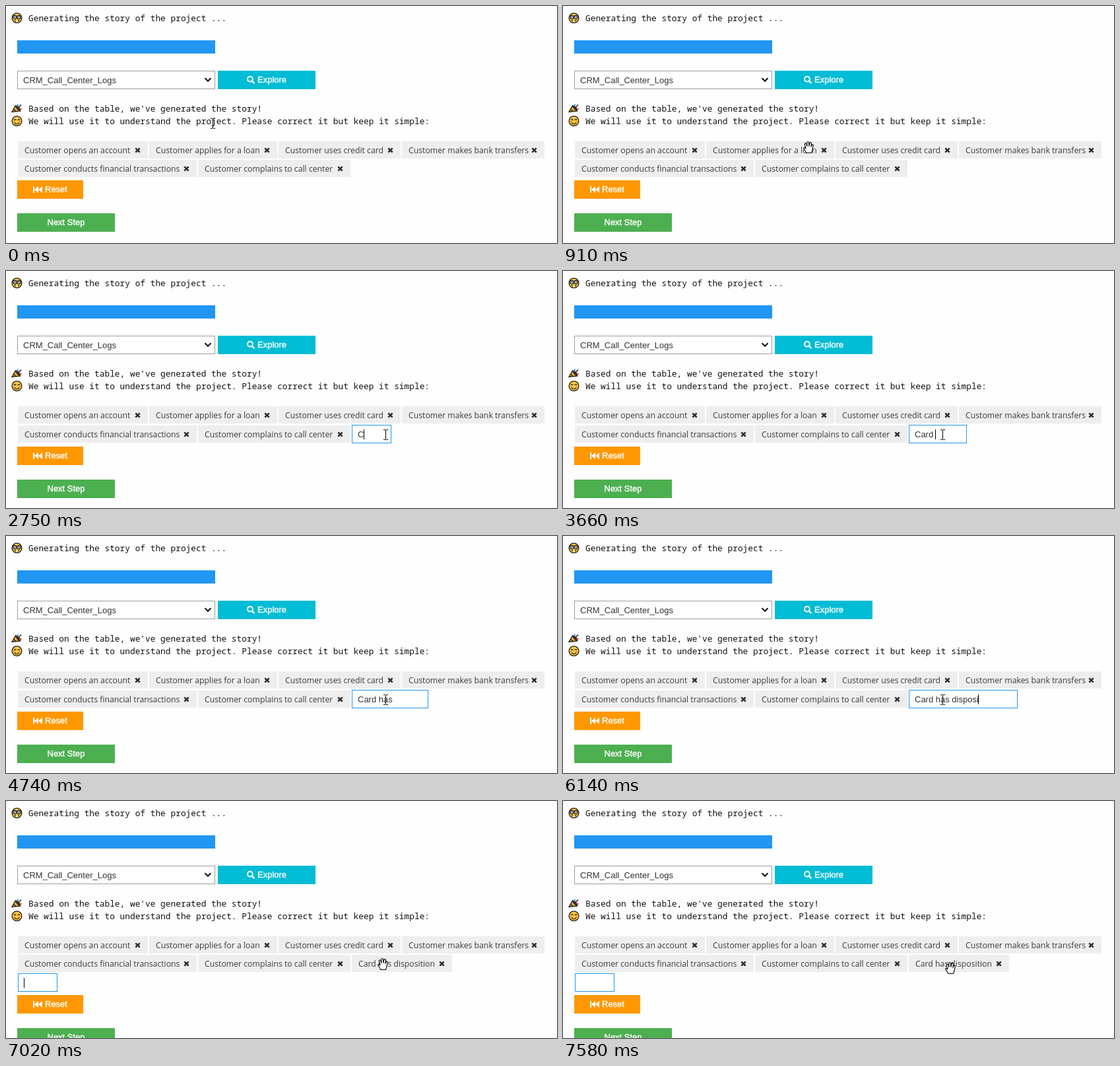
An HTML page with a canvas for the animation above (8000 ms loop, 835x359 px).

```html
<!DOCTYPE html>
<html lang="en">
<head>
<meta charset="utf-8">
<title>Story builder</title>
<style>
  html, body { margin: 0; width: 100%; height: 100%; overflow: hidden; background: #fefefe; }
  canvas { display: block; width: 835px; height: 359px; }
</style>
</head>
<body>
<canvas id="stage"></canvas>
<script>
const W = 835, H = 359, LOOP = 8000;
const canvas = document.getElementById('stage');
const ctx = canvas.getContext('2d');
const dpr = window.devicePixelRatio || 1;
canvas.width = Math.round(W * dpr);
canvas.height = Math.round(H * dpr);

const MONO = '12.83px "Noto Sans Mono", monospace';
const SANS = '13px "Liberation Sans", Arial, sans-serif';
const TAG = '12.25px "Open Sans", sans-serif';
const BLUE = '#2196f3', INK = '#333';

const ENTRY = 'Card has disposition';
const OPEN = 1820, COMMIT = 7020;

// [time, typed characters]
const KEYS = [
  [OPEN, 0], [2750, 1], [3210, 2], [3360, 3], [3510, 4], [3660, 5], [3910, 6],
  [4030, 7], [4150, 9], [4890, 10], [5010, 11], [5160, 12], [5300, 13],
  [5430, 14], [5580, 15], [6140, 16], [6290, 17], [6440, 18], [6590, 19], [6740, 20]
];

// [time, x, y, pointer shape]
const POINTER = [
  [0, 313, 178, 'beam'], [430, 309, 142, 'arrow'], [550, 304, 102, 'arrow'],
  [670, 307, 134, 'arrow'], [790, 330, 176, 'beam'], [910, 372, 214, 'hand'],
  [1030, 424, 198, 'arrow'], [1150, 465, 171, 'beam'], [1270, 512, 214, 'hand'],
  [1390, 553, 248, 'beam'], [1540, 575, 248, 'beam'], [COMMIT, 571, 247, 'hand'],
  [7300, 580, 249, 'hand'], [7450, 584, 251, 'hand'], [7580, 587, 253, 'hand']
];

const ROW_1 = [
  [18, 215, 'Customer opens an account'],
  [217, 411, 'Customer applies for a loan'],
  [413, 598, 'Customer uses credit card'],
  [600, 816, 'Customer makes bank transfers']
];
const ROW_2 = [
  [18, 289, 'Customer conducts financial transactions'],
  [291, 522, 'Customer complains to call center']
];
const NEW_TAG = [524, 676, ENTRY];

const latest = (list, t) => list.reduce((hit, row) => (row[0] <= t ? row : hit), list[0]);

function rect(x, y, w, h, color) {
  ctx.fillStyle = color;
  ctx.fillRect(x, y, w, h);
}

function text(str, x, y, font, color) {
  ctx.font = font;
  ctx.fillStyle = color;
  ctx.fillText(str, x, y);
}

function frame(x, y, w, h, color) {
  rect(x, y, w, h, color);
  rect(x + 1, y + 1, w - 2, h - 2, '#fff');
}

function trace(points, close) {
  ctx.beginPath();
  points.forEach(([x, y]) => ctx.lineTo(x, y));
  if (close) ctx.closePath();
}

function stroke(color, width) {
  ctx.strokeStyle = color;
  ctx.lineWidth = width;
  ctx.stroke();
}

function disc(x, y, r, fill, line, width) {
  ctx.beginPath();
  ctx.arc(x, y, r, 0, Math.PI * 2);
  if (fill) { ctx.fillStyle = fill; ctx.fill(); }
  if (line) stroke(line, width);
}

function arc(x, y, r, from, to, color, width) {
  ctx.beginPath();
  ctx.arc(x, y, r, from * Math.PI, to * Math.PI);
  stroke(color, width);
}

function label(str, x, y) {
  text(str, x, y, SANS, '#fff');
  ctx.strokeStyle = '#fff';
  ctx.lineWidth = 0.4;
  ctx.strokeText(str, x, y);
}

function tag([left, right, str], top) {
  rect(left, top, right - left, 26, '#eee');
  text(str, left + 10, top + 18, TAG, '#3c3c3c');
  const cx = right - 15.5, cy = top + 13.5, r = 3.2;
  trace([[cx - r, cy - r], [cx + r, cy + r]]);
  stroke('#2c2c2c', 2.5);
  trace([[cx + r, cy - r], [cx - r, cy + r]]);
  stroke('#2c2c2c', 2.5);
}

function nerdFace(x, y) {
  disc(x, y, 7.4, '#ffc83d', '#1c1c1c', 1.3);
  for (const side of [-3, 3]) {
    disc(x + side, y - 1.2, 2.6, '#fff', '#1c1c1c', 1.3);
    disc(x + side, y - 1.2, 0.9, '#1c1c1c');
  }
  arc(x, y + 1.4, 3.6, 0.1, 0.9, '#1c1c1c', 1.2);
  rect(x - 1.5, y + 4, 3, 1.7, '#fff');
}

function smileFace(x, y) {
  disc(x, y, 7.4, '#ffc83d', '#1c1c1c', 1.3);
  for (const side of [-1, 1]) {
    disc(x + side * 4.6, y + 1.6, 1.6, '#ff9a4a');
    arc(x + side * 2.9, y - 0.9, 1.6, 1.05, 1.95, '#1c1c1c', 1.2);
  }
  arc(x, y + 0.8, 3.6, 0.12, 0.88, '#1c1c1c', 1.2);
}

function popper(x, y) {
  trace([[x - 7.5, y + 5], [x - 2, y - 4.5], [x + 5, y + 3.5]], true);
  ctx.fillStyle = '#f5b52e';
  ctx.fill();
  stroke('#1c1c1c', 1.4);
  trace([[x - 5, y + 0.8], [x - 1, y + 4.3]]);
  stroke('#1c1c1c', 1.3);
  ctx.beginPath();
  ctx.ellipse(x + 1.8, y - 0.8, 2.2, 5.2, -0.72, 0, Math.PI * 2);
  ctx.fillStyle = '#3a2a20';
  ctx.fill();
  trace([[x + 1, y - 3], [x + 1.5, y - 7]]);
  stroke('#2b7de0', 1.5);
  trace([[x + 3, y - 2.5], [x + 6.5, y - 6]]);
  stroke('#1c1c1c', 1.4);
  trace([[x + 4, y], [x + 7.5, y + 0.5]]);
  stroke('#e0483a', 1.5);
}

function searchIcon() {
  disc(369.9, 110.7, 3.9, null, '#fff', 2);
  trace([[372.8, 113.6], [376.3, 117.1]]);
  stroke('#fff', 2.5);
}

function rewindIcon(x, y) {
  rect(x, y, 2, 10, '#fff');
  for (const dx of [2, 8]) {
    trace([[x + dx, y + 5], [x + dx + 6, y], [x + dx + 6, y + 10]], true);
    ctx.fillStyle = '#fff';
    ctx.fill();
  }
}

function input(x, y, width, str, caret) {
  frame(x, y, width, 28, BLUE);
  text(str, x + 9, y + 19, SANS, INK);
  if (caret) rect(Math.floor(x + 9 + ctx.measureText(str).width), y + 7, 1, 15, '#000');
}

const pointers = {
  beam(x, y) {
    rect(x, y - 7, 1, 14, '#000');
    for (const top of [y - 8, y + 7]) {
      rect(x - 3, top, 3, 1, '#000');
      rect(x + 1, top, 3, 1, '#000');
    }
  },
  arrow(x, y) {
    trace([[0, 0], [0, 16], [3.7, 12.5], [6.2, 18], [8.6, 17], [6.2, 11.6], [11.3, 11.6]]
      .map(([dx, dy]) => [x + dx + 0.5, y + dy + 0.5]), true);
    ctx.fillStyle = '#fff';
    ctx.fill();
    stroke('#000', 1);
  },
  hand(x, y) {
    ctx.save();
    ctx.translate(x - 8, y - 9);
    ctx.lineJoin = 'round';
    ctx.beginPath();
    ctx.moveTo(4.5, 17.5);
    ctx.bezierCurveTo(4, 14.5, 1.5, 13, 0.8, 10.5);
    ctx.bezierCurveTo(0.8, 8.8, 2.6, 9, 4, 11);
    ctx.lineTo(2.3, 4.5);
    ctx.bezierCurveTo(2, 2.4, 4.3, 2, 4.9, 4);
    ctx.lineTo(5.9, 7.5);
    ctx.lineTo(5.8, 2);
    ctx.bezierCurveTo(5.8, 0, 8.5, 0, 8.6, 2);
    ctx.lineTo(8.9, 7.5);
    ctx.lineTo(9.8, 2.8);
    ctx.bezierCurveTo(10.3, 0.9, 12.6, 1.4, 12.4, 3.3);
    ctx.lineTo(11.9, 8.2);
    ctx.lineTo(13, 5.8);
    ctx.bezierCurveTo(13.8, 4.2, 15.8, 5, 15.2, 6.9);
    ctx.bezierCurveTo(14.2, 10.5, 14.2, 14, 12.5, 17.5);
    ctx.closePath();
    ctx.fillStyle = '#fff';
    ctx.fill();
    stroke('#000', 1.1);
    ctx.restore();
  }
};

function header() {
  nerdFace(16.5, 18.3);
  text('Generating the story of the project ...', 34, 23, MONO, '#111');
  rect(17, 52, 300, 20, BLUE);

  frame(17, 98, 300, 28, '#9e9e9e');
  text('CRM_Call_Center_Logs', 26, 117, SANS, INK);
  trace([[301.5, 109.3], [306, 113.8], [310.5, 109.3]]);
  stroke('#111', 2);

  rect(321, 98, 148, 28, '#00bcd4');
  searchIcon();
  label('Explore', 381, 116);

  popper(16.5, 155.5);
  text("Based on the table, we've generated the story!", 34, 160, MONO, '#111');
  smileFace(16.5, 174.3);
  text('We will use it to understand the project. Please correct it but keep it simple:',
    34, 179, MONO, '#111');
}

function draw(t) {
  const typing = t >= OPEN && t < COMMIT;
  const done = t >= COMMIT;
  ctx.setTransform(dpr, 0, 0, dpr, 0, 0);
  rect(0, 0, W, H, '#fefefe');
  header();

  ROW_1.forEach(item => tag(item, 205));
  ROW_2.forEach(item => tag(item, typing ? 234 : 233));

  if (typing) {
    const [pressed, count] = latest(KEYS, t);
    const caret = t - pressed < (count ? 590 : 530);
    input(524, 233, Math.max(60, 53 + 7 * count), ENTRY.slice(0, count), caret);
  } else if (done) {
    tag(NEW_TAG, 233);
    input(18, 261, 60, '', t - COMMIT < 530);
  }

  const top = done ? 294 : typing ? 266 : 264;
  rect(17, top, 100, 28, '#ff9800');
  rewindIcon(41, top + 9);
  label('Reset', 59, top + 18);
  rect(17, top + 50, 148, 28, '#4caf50');
  label('Next Step', 62.5, top + 68);

  const [, x, y, shape] = latest(POINTER, t);
  pointers[shape](x, y);
}

const start = performance.now();
function tick() {
  draw((performance.now() - start) % LOOP);
  requestAnimationFrame(tick);
}
tick();
</script>
</body>
</html>
```
